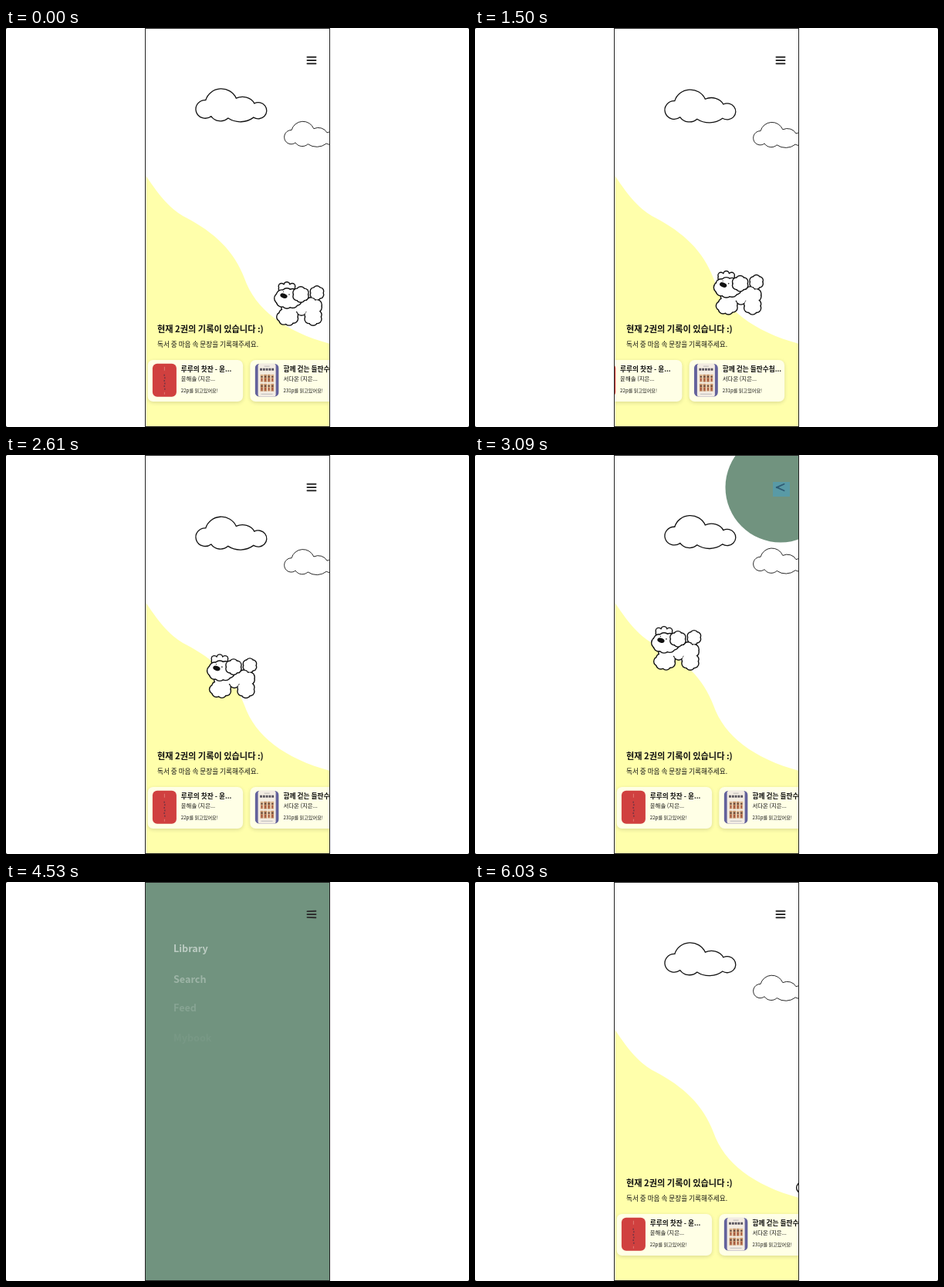
An HTML page with a canvas for the animation above (6060 ms loop, 600 px wide and 518 px high).

```html
<!DOCTYPE html>
<html lang="ko">
<head>
<meta charset="utf-8">
<style>
  html, body { margin: 0; width: 100%; height: 100%; overflow: hidden; background: #000; }
  canvas { display: block; width: 600px; height: 518px; border-radius: 2px; }
</style>
</head>
<body>
<canvas width="600" height="518"></canvas>
<script>
const c = document.querySelector('canvas').getContext('2d');
const LOOP = 6060, OPEN = 3000, CLOSE = 4300;
const TAU = Math.PI * 2, FONT = '"Noto Sans CJK KR", "Noto Sans KR", "Noto Sans CJK", sans-serif';
const clamp = p => Math.max(0, Math.min(1, p));
const span = (t, from, length) => clamp((t - from) / length);
const easeOut = p => 1 - (1 - p) ** 2;
const smooth = p => (1 - Math.cos(Math.PI * p)) / 2;
const mix = (a, b, p) => a + (b - a) * p;

const hill = new Path2D('M181.5 192C201 221 213 235 233 246C271 266 296 290 309 325C323 365 361 394 420 410V518H181.5Z');
const cloudShape = new Path2D('M14 14.5A21 21 0 0 1 53.5 12A17 15 0 0 1 77 19A11 11 0 1 1 76 38A28 28 0 0 1 43 39A14.6 14.6 0 0 1 21 36.5A12.3 12.3 0 1 1 14 14.5Z');

function text(s, x, y, size, weight = 400, color = '#111') {
  c.font = `${weight} ${size}px ${FONT}`;
  c.fillStyle = color;
  c.fillText(s, x, y);
}

function rect(x, y, w, h, color, r = 0) {
  c.fillStyle = color;
  c.beginPath();
  c.roundRect(x, y, w, h, r);
  c.fill();
}

function oval(x, y, rx, ry, color, turn = 0) {
  c.fillStyle = color;
  c.beginPath();
  c.ellipse(x, y, rx, ry, turn, 0, TAU);
  c.fill();
}

function cloud(x, y, sx, sy, width) {
  const p = new Path2D();
  p.addPath(cloudShape, new DOMMatrix([sx, 0, 0, sy, x, y]));
  c.fillStyle = '#fff';
  c.fill(p);
  c.strokeStyle = '#111';
  c.lineWidth = width;
  c.stroke(p);
}

// Fluffy ellipses, each a ring of bumps, merged under one outline.
function puff(parts) {
  for (const [color, grow] of [['#111', 0], ['#fff', -1.4]]) {
    for (const [x, y, rx, ry, n] of parts) {
      const b = Math.min(rx, ry) * 0.56;
      for (let i = 0; i < n; i++) {
        const a = (i + 0.5) / n * TAU;
        oval(x + (rx - b) * Math.cos(a), y + (ry - b) * Math.sin(a), b + grow, b + grow, color);
      }
      oval(x, y, rx - b * 0.6 + grow, ry - b * 0.6 + grow, color);
    }
  }
}

// Layers: tail with body and legs, tuft, head, ear.
const stand = [
  [[56, 15, 10, 10, 6], [36, 32, 28, 13, 10], [51, 46, 12.5, 12, 6], [18, 46, 15, 12, 7]],
  [[17, 8, 12.5, 8, 6]], [[19, 22, 19, 14, 9]], [[35, 17, 11.5, 11, 6]]];
const run = [
  [[69, 14, 8, 8, 6], [46, 28, 29, 16, 10], [64, 41, 12.5, 9, 6], [15, 36, 12, 8.5, 6]],
  [[22, 7, 7, 7, 5]], [[20, 21, 20, 13, 9]], [[42, 14, 9, 10, 6]]];

const walk = [[0, 347, 329], [990, 320, 329], [2070, 296, 299], [3090, 228, 222], [4200, 140, 130],
  [4300, 480, 417], [5500, 453, 400], [6030, 416, 375], [6060, 414, 374]];

function dog(t) {
  const i = walk.findIndex(k => k[0] > t);
  const [a, b] = [walk[i - 1], walk[i]];
  const p = span(t, a[0], b[0] - a[0]);
  const running = t % 500 >= 250;
  c.save();
  c.translate(mix(a[1], b[1], p) - running * 6, mix(a[2], b[2], p) + running * 5);
  (running ? run : stand).forEach(puff);
  oval(13, 18.7, 4.8, 3, '#111', running ? 0.1 : 0.35);
  oval(running ? 21 : 12.5, running ? 15 : 13.5, 0.6, 0.6, '#111');
  oval(running ? 25 : 20, 17, 0.8, 0.8, '#111');
  c.restore();
}

function redCover() {
  rect(0, 0, 31, 43, '#d0403f', 6);
  rect(15, 4, 0.8, 5, '#e58a80');
  for (let i = 0; i < 6; i++) rect(14.5 + i % 2 * 0.6, 14 + i * 3.6, 1.6, 2, '#7c3542');
  rect(15, 37, 0.8, 3, '#e58a80');
}

function paleCover() {
  c.save();
  c.beginPath();
  c.roundRect(0, 0, 31, 43, 6);
  c.clip();
  rect(0, 0, 31, 43, '#63629c');
  rect(4, 0, 23, 43, '#f3ece2', 3);
  rect(12, 3, 7, 0.8, '#aaa');
  for (let i = 0; i < 5; i++) rect(6.5 + i * 3.8, 6, 2.8, 3, '#55505a');
  for (let i = 0; i < 8; i++) {
    const x = 7 + i % 4 * 4.6, y = 14 + (i >> 2) * 12;
    rect(x, y, 3.8, 10, i % 3 ? '#c9976c' : '#dfb98f');
    rect(x + 0.8, y + 2, 2.2, 2, '#5b4038');
    rect(x + 1, y + 5, 1.8, 4, '#a4553f');
  }
  rect(8, 39, 15, 1, '#bbb');
  c.restore();
}

function card(x, cover, title, author, progress) {
  c.save();
  c.shadowColor = 'rgba(0,0,0,.14)';
  c.shadowBlur = 5;
  c.shadowOffsetY = 1.5;
  rect(x, 431, 123.5, 54, '#ffffe6', 7);
  c.restore();
  c.save();
  c.translate(x + 6.3, 435.7);
  cover();
  c.restore();
  text(title, x + 43.2, 446.1, 8.7, 700);
  text(author, x + 43.2, 457.8, 7.4);
  text(progress, x + 43.2, 472.5, 6.15);
}

function radius(t) {
  const full = 1159;
  if (t < OPEN) return 0;
  if (t < CLOSE + 500) {
    const s = (t - OPEN) / 1000;
    return full * (1 - (7.236 * Math.exp(-2.764 * s) - 2.764 * Math.exp(-7.236 * s)) / 4.472);
  }
  const u = (t - CLOSE - 500) / 50;
  const r = full * (1 + u) * Math.exp(-u);
  return r < 0.5 ? 0 : r;
}

const bounce = s => s <= 0 ? 0 : 1 - Math.exp(-14 * s) * (Math.cos(28 * s) + 0.5 * Math.sin(28 * s));

function menu(t) {
  oval(396, 42, radius(t), radius(t), '#71937f');
  ['Library', 'Search', 'Feed', 'Mybook'].forEach((label, i) => {
    const enter = OPEN + 200 + i * 70, leave = CLOSE + (3 - i) * 50;
    c.globalAlpha = easeOut(span(t, enter, 250)) * (1 - easeOut(span(t, leave, 300)));
    const drop = 1 - bounce((t - enter) / 1000) + bounce((t - leave) / 1000);
    if (c.globalAlpha) text(label, 217, [76, 114.5, 153.5, 193.5][i] + 14 * drop, 12.6, 700, '#fff');
    c.globalAlpha = 1;
  });
}

function icon(t) {
  const p = easeOut(span(t, OPEN, 300)) - easeOut(span(t, CLOSE, 300));
  const fade = easeOut(span(t, OPEN, 100)) - easeOut(span(t, CLOSE, 100));
  const line = (x1, y1, x2, y2) => {
    c.beginPath();
    c.moveTo(x1, y1);
    c.lineTo(x2, y2);
    c.stroke();
  };
  c.save();
  c.translate(389.2, 36.2);
  c.scale(0.615, 0.615);
  c.strokeStyle = '#2e2e2e';
  c.lineWidth = 3;
  c.lineCap = 'round';
  line(mix(2, 3, p), mix(2.5, 16.5, p), mix(20, 17, p), 2.5);
  line(mix(2, 3, p), mix(16.35, 2.5, p), mix(20, 17, p), 16.35);
  c.globalAlpha = 1 - fade;
  line(2, 9.42, 20, 9.42);
  c.restore();
  if ([OPEN, CLOSE].some(tap => t > tap - 40 && t < tap + 160)) rect(386, 35, 22, 19, 'rgba(51,165,229,.38)');
}

function draw(t) {
  rect(0, 0, 600, 518, '#fff');
  c.save();
  c.beginPath();
  c.rect(180, 0, 240, 518);
  c.clip();

  c.fillStyle = '#ffffab';
  c.fill(hill);
  const bob = 1.6 * (1 + Math.cos((t - 2080) / 3000 * TAU));
  cloud(244.8, 78.6 + bob, 1, 0.96, 1.3);
  cloud(359.8, 120.8 + bob, 0.73, 0.74, 0.9);
  dog(t);

  text('현재 2권의 기록이 있습니다 :)', 196, 394.6, 11.2, 700);
  text('독서 중 마음 속 문장을 기록해주세요.', 196, 413.8, 8.65);
  const scroll = 45.5 * (smooth(span(t, 690, 270)) - smooth(span(t, 1400, 400)));
  card(183.6 - scroll, redCover, '루루의 찻잔 - 윤...', '윤해솔 (지은...', '22p를 읽고있어요!');
  card(316.3 - scroll, paleCover, '함께 걷는 들판수첩...', '서다온 (지은...', '231p를 읽고있어요!');

  menu(t);
  icon(t);
  c.restore();
  c.strokeStyle = '#222';
  c.lineWidth = 1;
  c.strokeRect(180.5, 0.5, 239, 517);
}

const start = performance.now();
(function tick() {
  draw((performance.now() - start) % LOOP);
  requestAnimationFrame(tick);
})();
</script>
</body>
</html>
```
